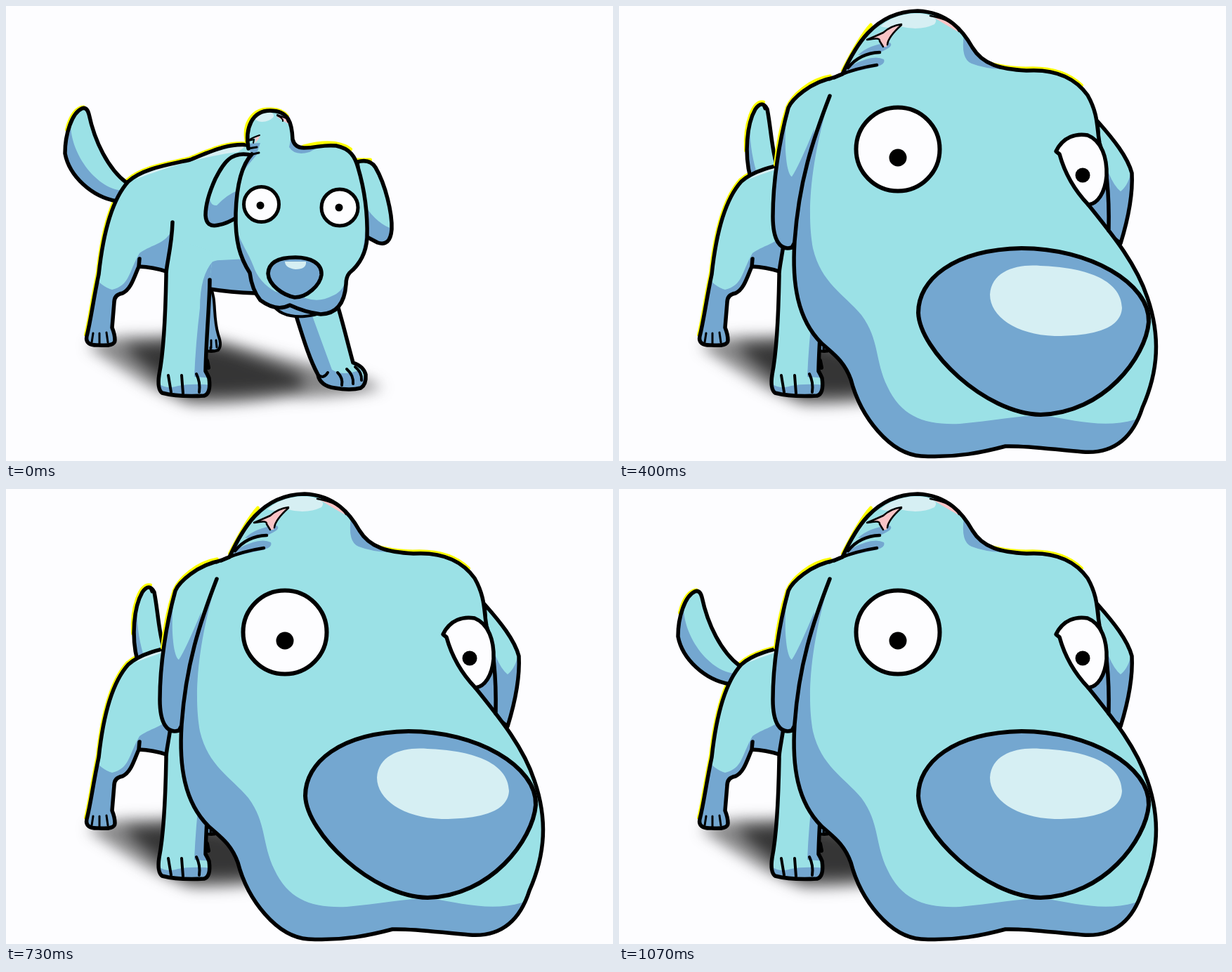
Write an HTML page with a canvas that moves like this. It is 864 px wide and 648 px high and loops after 1140 ms.

```html
<!DOCTYPE html>
<html lang="en">
<head>
<meta charset="utf-8">
<title>Blue dog</title>
<style>
html, body { margin: 0; width: 864px; height: 648px; overflow: hidden; background: #fdfdff; }
canvas { display: block; }
</style>
</head>
<body>
<canvas id="stage" width="864" height="648"></canvas>
<script>
const ctx = document.getElementById('stage').getContext('2d');
const INK = '#000', LIGHT = '#9be1e6', SHADE = '#74a7d0', PALE = '#d6eff3', PINK = '#f9c4c6', WHITE = '#fdfdff';
const LOOP = 1140;
ctx.lineCap = ctx.lineJoin = 'round';

function fill(d, color) {
  ctx.fillStyle = color;
  ctx.fill(new Path2D(d));
}

function line(d, width = 5, color = INK) {
  ctx.lineWidth = width;
  ctx.strokeStyle = color;
  ctx.stroke(new Path2D(d));
}

function glow(d) {
  ctx.save();
  ctx.translate(-1.5, -2);
  line(d, 5, '#ffff00');
  ctx.restore();
}

// Filled form with patches clipped to it, then its outline.
function form(d, patches = [], width = 5.5, base = LIGHT, edge = d) {
  fill(d, base);
  ctx.save();
  ctx.clip(new Path2D(d));
  for (const [p, color] of patches) fill(p, color);
  ctx.restore();
  line(edge, width);
}

function eye(x, y, rx, ry, px, py, pr, width) {
  ctx.beginPath();
  ctx.ellipse(x, y, rx, ry, 0, 0, 7);
  ctx.fillStyle = WHITE;
  ctx.fill();
  ctx.lineWidth = width;
  ctx.strokeStyle = INK;
  ctx.stroke();
  pupil(px, py, pr);
}

function pupil(x, y, r) {
  ctx.beginPath();
  ctx.arc(x, y, r, 0, 7);
  ctx.fillStyle = INK;
  ctx.fill();
}

function ground() {
  ctx.save();
  ctx.filter = 'blur(10px)';
  fill('M116 484 Q150 468 205 470 Q270 466 320 480 Q390 500 440 512 Q505 525 536 544 Q480 558 400 558 Q320 570 262 568 Q215 550 180 526 Q145 505 116 484Z', 'rgba(40,40,40,.55)');
  fill('M168 486 Q240 474 310 488 Q365 505 410 522 Q440 540 410 545 Q330 556 260 554 Q215 530 168 486Z', 'rgba(30,30,30,.78)');
  ctx.restore();
}

const tails = {
  left() {
    const d = 'M172 252 C145 232 126 192 118 154 Q115 143 108 146 C94 152 84 182 84 210 C90 242 122 272 158 278';
    glow('M88 178 C93 158 102 146 112 146');
    form(d, [['M92 168 C92 212 130 262 168 263 L160 285 L75 280 L75 170Z', SHADE]]);
  },
  up() {
    const d = 'M187 244 C178 210 182 168 194 147 Q204 133 211 147 C216 172 217 200 224 225';
    glow('M182 208 C180 170 192 136 207 139');
    form(d, [['M187 160 C185 190 189 215 198 245 L172 250 L172 160Z', SHADE]]);
    line('M206 141 L208 146', 5);
  },
  smear() {
    const d = 'M205 230 C196 196 194 172 191 142 Q190 136 183 137 Q145 135 110 144 Q138 146 167 149 Q158 158 158 170 Q138 170 122 176 L128 180 Q113 187 97 187 Q117 190 120 200 Q135 206 158 206 Q157 218 160 230 Q145 231 132 235 L117 240 Q140 239 161 241 Q165 250 170 258';
    glow('M110 144 Q150 134 188 137');
    form(d, [['M167 149 C170 190 165 215 180 248 L165 262 L90 250 L90 165Z', SHADE]], 4);
  }
};

function body(tail) {
  ground();
  // far legs
  form('M291 400 C300 420 294 440 302 468 Q308 484 302 490 Q291 494 284 490 L280 400Z', [['M276 390 H298 L310 495 H276Z', SHADE]], 4);
  line('M292 476 V487 M299 476 L300 486', 3);
  form('M412 438 C425 480 433 505 444 525 Q447 541 468 544 Q490 548 505 544 Q513 539 512 525 Q509 513 494 508 C485 475 478 445 470 420 Z',
    [['M405 430 L434 436 Q450 480 464 518 Q480 528 505 518 L515 550 L440 550Z', SHADE]]);
  line('M444 525 Q452 532 458 522 M472 522 Q480 530 478 540 M485 517 Q495 526 494 538 M497 514 Q507 522 506 533', 4);

  const left = 'M174 250 C147 280 137 335 132 382 C123 425 121 446 115 470';
  const back = 'M174 250 C195 231 232 226 262 219 C292 207 316 195 345 198';
  glow(left);
  glow(back);
  tail();
  const trunk = 'M174 250 C195 231 232 226 262 219 C292 207 316 195 345 198 L420 230 L420 408 L355 409 Q320 408 290 403 L228 378 Q210 373 189 371 C182 387 178 403 166 409 Q154 410 154 422 L151 458 Q158 470 155 479 Q150 485 135 483 Q118 483 115 478 Q113 474 118 462 C121 440 125 415 132 382 C137 335 147 280 174 250Z';
  form(trunk, [
    ['M120 380 Q136 400 151 404 C176 398 174 380 190 352 C210 338 226 340 237 318 L232 382 L190 374 L160 450 V490 H105Z', SHADE],
    ['M270 420 Q277 361 305 362 L420 356 V420Z', SHADE],
    ['M184 247 C215 223 280 212 346 196 L330 208 C285 213 230 229 184 247Z', PALE]
  ], 5.5, LIGHT, back + left + 'M115 470 Q112 484 132 483 Q155 485 155 476 Q155 468 151 458 L154 422 Q154 411 166 409 C178 403 182 387 189 371 L190 360 M189 371 Q210 372 228 378 M290 403 Q320 408 355 409');
  line('M124 466 L122 479 M133 466 V481 M143 465 L145 479', 3);

  // near front leg
  const leg = 'M236 330 C233 355 227 372 228 384 C227 440 224 495 218 525 Q215 545 222 551 Q245 557 282 555 Q292 552 289 530 Q287 525 284 520 C285 470 290 420 290 390 L295 350Z';
  form(leg, [
    ['M298 360 Q276 380 276 430 Q270 480 268 528 L295 530Z', SHADE],
    ['M210 532 Q225 548 245 541 Q265 537 295 540 V565 H210Z', SHADE]
  ], 5.5, LIGHT, 'M237 308 C236 345 227 372 228 384 C227 440 224 495 218 525 Q215 545 222 551 Q245 557 282 555 Q292 552 289 530 Q287 525 284 520 C285 470 290 420 290 390');
  line('M231 526 L235 550 M250 526 L252 552 M271 524 Q277 536 275 550', 4);
  line('M286 505 L288 515', 6);
  line('M291 486 V490 L296 491', 3);
}

function smallHead() {
  glow('M344 196 C338 168 354 148 376 149 Q394 148 402 159 M425 202 Q470 190 492 206 M500 221 L520 221');
  form('M352 213 C320 204 309 225 298 246 Q284 277 284 298 Q285 316 302 312 Q315 310 330 300Z',
    [['M292 250 Q285 286 300 284 Q315 268 332 262 V320 H278Z', SHADE]]);
  form('M500 222 Q518 217 526 230 C540 254 550 295 549 318 Q547 343 529 337 L512 328Z',
    [['M512 286 Q530 312 552 318 V345 H508Z', SHADE]]);
  form('M379 424 Q390 444 425 442 Q440 441 455 435 L404 420Z', [], 4, SHADE);
  const d = 'M345 203 C340 174 350 149 376 149 C402 149 407 166 408 190 Q411 202 424 202 C444 202 450 197 470 199 C490 203 497 215 501 230 C510 260 515 290 514 330 Q512 361 489 380 Q484 386 484 396 Q481 438 448 439 Q425 436 404 426 Q385 436 362 419 Q350 404 347 380 C333 358 326 335 327 295 C328 262 334 228 350 211Z';
  form(d, [
    ['M320 290 C330 335 344 348 352 370 Q360 394 384 407 Q400 410 410 409 Q440 426 464 413 Q478 408 485 390 L488 450 H315Z', SHADE],
    ['M490 385 Q510 360 511 320 L520 380Z', SHADE],
    ['M407 182 Q410 202 445 201 L432 208 Q411 214 403 201Z', SHADE],
    ['M352 211 Q338 225 331 250 L340 232 L360 208Z', SHADE],
    ['M343 196 L362 195 L356 213 L340 214Z', SHADE],
    ['M354 161 Q360 151 378 152 Q386 157 374 163 Q362 168 354 161Z', PALE],
    ['M386 154 Q402 158 402 168 L386 158Z', PINK]
  ], 5.5, LIGHT, d.slice(0, -1));
  fill('M362 184 L347 192 L356 189 L354 196 L359 190Z', PINK);
  line('M361 184 Q354 186 345 191 M345 192 L353 190 L352 195 M386 155 L399 160 L401 165 M386 156 Q395 160 394 164', 2);
  line('M345 203 L357 201 M347 212 L360 209', 3);
  eye(363.5, 282.5, 25, 25, 362, 284, 5.5, 5);
  eye(475, 287, 26, 26, 474, 287, 5.5, 5);
  form('M373 381 C374 362 394 358 412 358 C433 358 450 366 449 383 C447 398 428 415 411 415 C395 412 374 398 373 381Z',
    [['M397 364 H427 Q428 375 412 375 Q397 373 397 364Z', PALE]], 5.5, SHADE);
}

function midHead() {
  glow('M372 134 C345 132 330 165 312 202 M375 120 C377 88 402 66 435 66 Q460 67 474 84 M530 131 C570 114 602 114 632 139 M650 172 Q669 173 675 184');
  form('M378 135 C350 129 335 155 321 182 C302 223 291 257 288 295 C287 318 300 325 330 305Z',
    [['M296 225 Q294 263 306 258 Q324 248 338 236 V330 H280Z', SHADE]]);
  form('M646 172 C674 172 686 202 694 232 C704 267 706 300 702 321 Q696 338 666 320Z',
    [['M660 255 Q681 288 708 295 V340 H660Z', SHADE]]);
  line('M450 532 Q455 546 480 546 Q505 546 510 540', 5);
  form('M452 528 Q480 543 540 539 Q575 538 591 524 L535 490Z', [], 5.5, SHADE);
  const d = 'M374 140 C370 95 395 66 435 66 C466 67 482 92 494 112 Q508 134 540 130 C572 115 600 117 624 130 C641 142 645 157 649 172 C661 210 666 270 668 320 C673 365 671 404 661 430 Q656 444 647 453 C642 485 633 518 588 524 C565 520 550 507 535 497 C512 512 490 529 452 527 C417 517 389 487 377 461 C350 443 331 415 328 385 C325 340 328 300 333 255 C340 205 347 163 374 145Z';
  form(d, [
    ['M372 148 C352 180 352 215 348 255 C341 320 345 365 375 396 C405 429 415 461 450 473 C490 471 510 459 535 457 Q565 450 580 462 C602 481 622 480 634 474 C642 430 658 405 666 370 L690 380 V550 H315 V150Z', SHADE],
    ['M470 80 C485 118 500 129 530 131 L510 136 Q490 128 470 80Z', SHADE],
    ['M370 128 Q390 117 398 124 L390 135 L372 148Z', SHADE],
    ['M390 87 Q402 70 430 70 Q436 76 420 81 Q403 88 390 87Z', PALE],
    ['M440 68 Q461 70 469 83 Q455 76 440 68Z', PINK]
  ]);
  fill('M411 89 Q394 93 381 108 Q388 104 391 105 L388 114 L393 115 Q394 103 411 89Z', PINK);
  line('M411 89 Q392 94 380 107 M381 109 Q390 102 390 107 L387 115 M411 90 Q398 101 396 110 M441 69 Q461 73 468 82', 2);
  line('M375 132 Q382 126 391 126 M372 146 Q380 139 391 137', 4);
  eye(424, 230, 40, 40, 421, 237, 9, 5);
  eye(622, 248, 34.5, 38.5, 620, 253, 9, 5);
  form('M450 377 C452 345 490 326 540 326 C590 326 630 350 628 382 C622 420 585 455 540 456 C500 455 452 415 450 377Z',
    [['M485 346 Q488 330 540 331 Q606 330 608 352 C602 372 565 379 535 377 Q487 374 485 346Z', PALE]], 5.5, SHADE);
}

function bigHead() {
  glow('M302 102 C272 107 248 130 241 146 C230 180 226 207 224 228 M320 94 Q345 45 360 29 M515 78 Q540 90 580 91 Q632 88 660 115');
  form('M681 164 C704 190 724 215 730 238 C732 275 722 312 714 338 L690 320Z',
    [['M683 190 Q696 250 714 264 Q726 255 731 228 L738 300 L714 345 L680 320Z', SHADE]]);
  form('M306 102 C272 108 246 133 241 145 C228 192 219 250 219 300 C219 333 229 349 246 344 L270 300 L310 120Z',
    [['M238 160 C234 210 240 241 246 243 Q255 230 278 175 L262 350 H210 V230Z', SHADE]]);
  const rim = 'C335 60 362 8 425 7 C469 9 490 36 503 59 C518 84 544 90 580 92 C625 89 652 106 667 127 C683 155 680 176 684 195 C695 228 698 270 697 320';
  const jaw = 'C771 470 768 520 745 572 C730 619 700 638 660 635 C620 632 584 626 550 627 C520 635 480 644 430 641 C386 638 344 586 330 532 C320 504 303 494 288 480 C254 446 246 395 250 335 C256 250 276 190 300 128';
  form('M318 97 ' + rim + ' L714 340 C732 366 745 390 752 415 ' + jaw + ' L300 104Z', [
    ['M300 130 C270 230 268 300 276 345 C288 395 320 410 345 440 C371 475 364 505 382 542 C402 585 435 597 485 595 C530 591 570 583 603 583 C650 590 690 602 735 589 L765 655 H330 L240 480 V250Z', SHADE],
    ['M668 283 Q692 275 692 235 L704 330Z', SHADE],
    ['M491 40 Q486 76 502 82 Q520 89 545 90 L505 59Z', SHADE],
    ['M372 29 Q395 9 430 11 Q458 15 449 26 Q428 36 400 29 Q385 33 372 29Z', PALE],
    ['M443 13 Q476 18 485 38 Q465 27 443 13Z', PINK],
    ['M330 85 Q362 68 377 76 Q380 83 365 87 L315 98Z', SHADE],
    ['M340 70 Q355 55 385 52 Q392 56 378 63 L370 67Z', SHADE]
  ], 5.5, LIGHT, 'M306 102 L318 97 ' + rim + 'M668 283 C700 323 736 366 752 415 ' + jaw);
  line('M300 104 L322 95', 5);
  fill('M402 26 Q378 34 354 47 Q371 45 371 50 L375 58 L381 58 Q379 49 402 26Z', PINK);
  line('M402 26 Q387 28 376 38 Q365 43 353 48 M354 48 Q372 44 371 50 L376 58 M402 27 Q383 44 382 55 M443 14 Q474 19 484 36', 2.5);
  line('M326 88 Q343 67 371 66 M312 99 Q340 88 367 84', 4.5);
  eye(397, 204, 59.5, 59.5, 397, 216, 12.5, 6);
  form('M622 207 C632 186 651 181 667 184 C687 192 695 216 694 242 C692 266 681 282 668 283 C648 262 635 240 627 211Z', [], 5.5, WHITE);
  pupil(660, 241, 10.5);
  form('M426 437 C426 390 475 347 573 345 C670 345 756 395 754 450 C750 500 690 580 600 582 C520 580 428 490 426 437Z',
    [['M528 411 C530 378 565 367 600 370 C660 372 715 388 716 430 C714 462 670 470 620 470 C565 468 528 442 528 411Z', PALE]], 6, SHADE);
}

// Draw a head fitted by a scale and an offset.
function fitted(head, sx, sy, x, y) {
  ctx.save();
  ctx.transform(sx, 0, 0, sy, x, y);
  head();
  ctx.restore();
}

const heads = [
  smallHead,
  () => fitted(midHead, .82, .8, 50, 55),
  midHead,
  () => fitted(bigHead, .99, .98, 17, 10)
];
const wag = 'LSUULSUULSUULLSUL';
const tailOf = { L: tails.left, S: tails.smear, U: tails.up };

function stepAt(t) {
  let k = 0;
  while (k < wag.length - 1 && Math.round((k + 1) * 20 / 3) * 10 <= t) k++;
  return k;
}

const start = performance.now();
let shown = -1;
function tick() {
  const k = stepAt((performance.now() - start) % LOOP);
  if (k !== shown) {
    shown = k;
    ctx.fillStyle = WHITE;
    ctx.fillRect(0, 0, 864, 648);
    body(tailOf[wag[k]]);
    (heads[k] || bigHead)();
  }
  requestAnimationFrame(tick);
}
tick();
</script>
</body>
</html>
```
